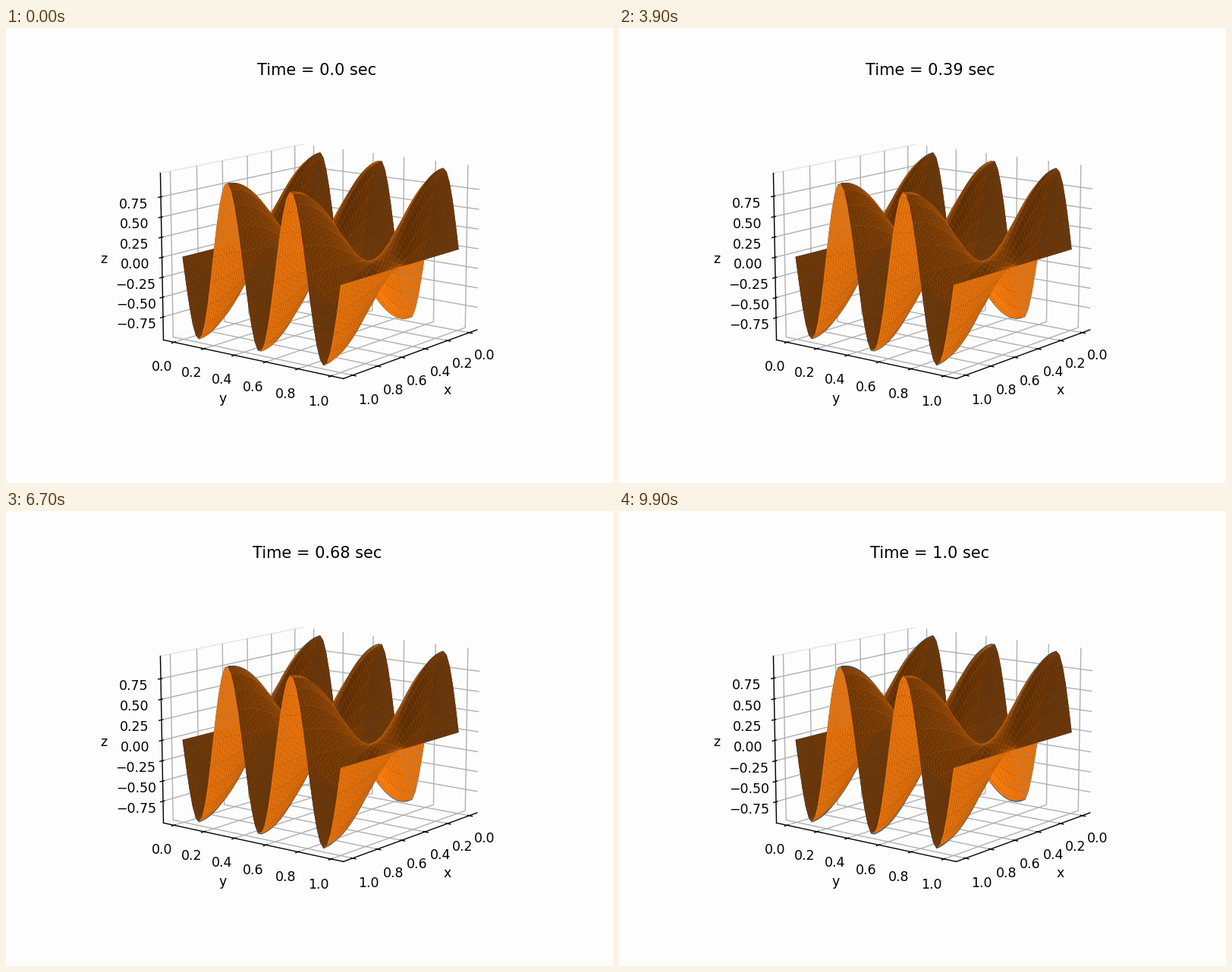
A matplotlib script for the animation above (10000 ms loop, 800 px wide and 600 px high).

```python
import numpy as np
import matplotlib.pyplot as plt
from matplotlib.animation import FuncAnimation

FRAMES = 100
N = 50
BG = "#fdfdfd"
RATES = (0.029, 0.041)  # decay of the rear and the front surface
TIMES = np.linspace(0, 1, FRAMES)

axis = np.linspace(0, 1, N)
X, Y = np.meshgrid(axis, axis)
MODE = np.cos(np.pi * X) * np.sin(5 * np.pi * Y)
PEAK = np.abs(MODE).max()


def quads(z):
    """Mesh cells as an array of four-cornered polygons."""
    p = np.dstack([X, Y, z])
    cells = np.stack([p[:-1, :-1], p[:-1, 1:], p[1:, 1:], p[1:, :-1]], axis=2)
    return cells.reshape(-1, 4, 3)


fig = plt.figure(figsize=(6.4, 4.8), dpi=125, facecolor=BG)
ax = fig.add_subplot(projection="3d", computed_zorder=False, facecolor=BG)
ax.view_init(elev=12.4, azim=37.8)

surfaces = [
    ax.plot_surface(X, Y, MODE, color=color, zorder=order)
    for order, color in enumerate(("C0", "C1"), start=1)
]

for a, edge in ((ax.xaxis, BG), (ax.yaxis, "#e8e8e8"), (ax.zaxis, BG)):
    a.pane.set_alpha(1)
    a.pane.set_edgecolor(edge)
    a.pane.fill = False

ax.set(xlabel="x", ylabel="y", zlabel="z")
ax.set_xticks(np.linspace(0, 1, 6))
ax.set_yticks(np.linspace(0, 1, 6))
ax.set_zticks(np.linspace(-0.75, 0.75, 7))

pad = 0.05 + 1.1 / 48
ax.set_xlim(-pad, 1 + pad)
ax.set_ylim(-pad, 1 + pad)


def update(i):
    t = TIMES[i]
    for surface, rate in zip(surfaces, RATES):
        surface.set_verts(quads(MODE * np.exp(-rate * t)))
    top = PEAK * np.exp(-RATES[0] * t) * 25 / 24
    ax.set_zlim(-top, top)
    ax.set_title(f"Time = {round(float(t), 2)} sec")
    return surfaces


anim = FuncAnimation(fig, update, frames=FRAMES, interval=100, repeat=True)
plt.show()
```
